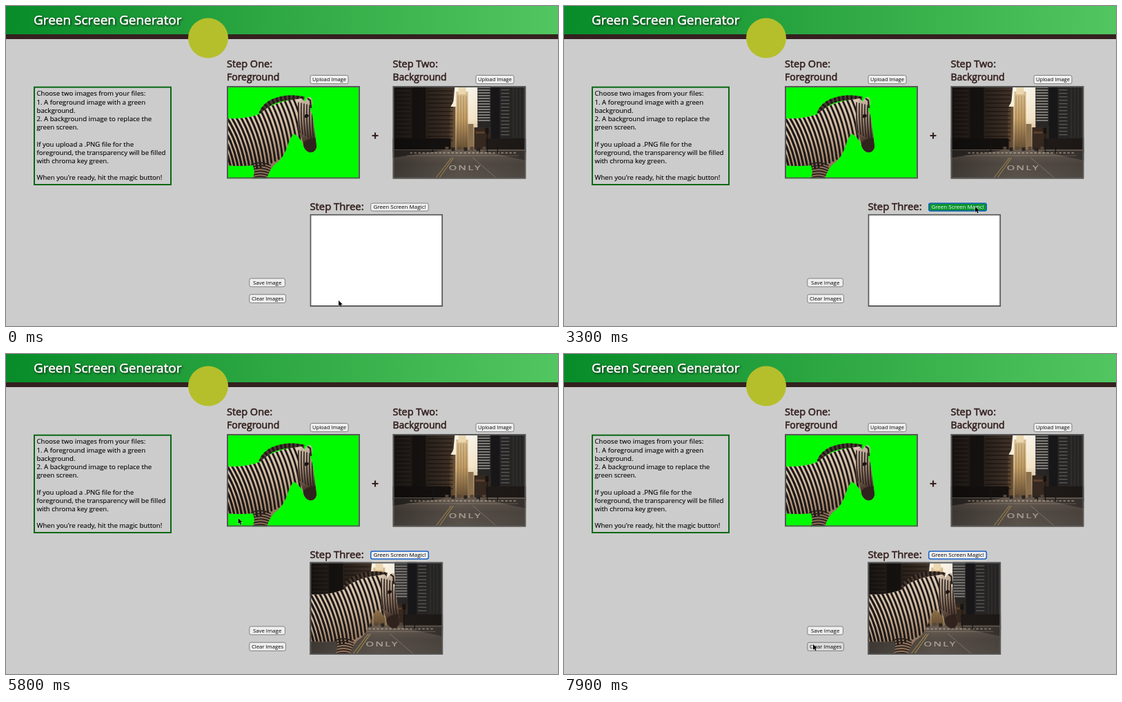
Animation, 800 px wide and 464 px high, one loop 8000 ms. Source, as an HTML page with a canvas:

```html
<!DOCTYPE html>
<html lang="en">
<head>
<meta charset="utf-8">
<title>Green Screen Generator</title>
<style>
  html, body { margin: 0; width: 100%; height: 100%; overflow: hidden; background: #ccc; }
  canvas, svg { position: absolute; left: 0; top: 0; width: 800px; height: 464px; }
  text { font-family: "Open Sans", "Noto Sans", sans-serif; white-space: pre; }
  .title { font-size: 19px; fill: #fff; stroke: #fff; stroke-width: .6px; filter: drop-shadow(1.2px 1.5px 1.5px rgba(0, 0, 0, .8)); }
  .head { fill: #34211f; stroke: #34211f; stroke-width: .6px; }
  .note { font-size: 9.64px; fill: #000; stroke: #000; stroke-width: .12px; }
  .btn rect { fill: #efefef; stroke: #747474; stroke-width: .9px; }
  .btn text { fill: #000; text-anchor: middle; }
  .btn.hover rect { fill: #dcdcdc; }
  .btn.go rect { fill: #0b952f; }
  .btn.go text { fill: #fff; }
  .btn.focus rect { stroke: #1760c4; stroke-width: 1.5px; }
</style>
</head>
<body>
<canvas id="stage" width="800" height="464"></canvas>
<svg id="ui" viewBox="0 0 800 464">
  <text class="title" x="40" y="27">Green Screen Generator</text>
  <g class="head">
    <text x="320" y="89.3" font-size="14.5">Step One:</text>
    <text x="320" y="108" font-size="14">Foreground</text>
    <text x="560.5" y="89.3" font-size="14.5">Step Two:</text>
    <text x="560.5" y="108" font-size="14">Background</text>
    <text x="440.5" y="295.6" font-size="14.8">Step Three:</text>
    <path d="M530.5 188h9M535 183.5v9" style="stroke-width:2.2px"/>
  </g>
  <g id="notes" class="note"></g>
  <g id="buttons"></g>
  <path id="cursor" d="M0 0v8l1.9-1.7 1.4 3.1 1.4-.6-1.4-3h2.6z" fill="#000" stroke="#fff" stroke-width=".7" paint-order="stroke"/>
</svg>
<script>
const LOOP = 8000, STEP = 100, CLICK = 3200, DONE = 3500;
const W = 193, H = 134.5;
const $ = id => document.getElementById(id);
const ctx = $("stage").getContext("2d");

function add(parent, tag, attrs, text) {
  const el = document.createElementNS("http://www.w3.org/2000/svg", tag);
  for (const k in attrs) el.setAttribute(k, attrs[k]);
  if (text) el.textContent = text;
  parent.appendChild(el);
  return el;
}

[
  "Choose two images from your files:",
  "1. A foreground image with a green",
  "background.",
  "2. A background image to replace the",
  "green screen.",
  "",
  "If you upload a .PNG file for the",
  "foreground, the transparency will be filled",
  "with chroma key green.",
  "",
  "When you're ready, hit the magic button!"
].forEach((line, i) => add($("notes"), "text", { x: 44.5, y: 130.4 + 12.2 * i }, line));

function button(label, x, y, w, h, size) {
  const g = add($("buttons"), "g", { class: "btn" });
  add(g, "rect", { x, y, width: w, height: h, rx: 2.4 });
  add(g, "text", { x: x + w / 2, y: y + h / 2 + 2.8, "font-size": size }, label);
  return { g, hit: (px, py) => px > x && px < x + w && py > y && py < y + h };
}
button("Upload Image", 441, 100.5, 55, 12.2, 7.5);
button("Upload Image", 681, 100.5, 55, 12.2, 7.5);
const magic = button("Green Screen Magic!", 528.7, 286, 83.6, 11.2, 8);
button("Save Image", 352.8, 395, 51.6, 12, 7.8);
const clear = button("Clear Images", 352.8, 418.2, 52.6, 12.2, 7.7);

// time, x, y
const route = [
  [0, 482, 427], [200, 488, 422], [900, 650, 310], [1400, 677, 298], [1900, 676, 297],
  [2700, 596, 291], [4400, 596, 291], [4900, 517, 277], [6200, 284, 227],
  [6700, 281, 226], [7500, 355, 411], [7800, 361, 421], [8000, 361, 421]
];
function pointer(t) {
  let i = 1;
  while (route[i][0] < t) i++;
  const [t0, x0, y0] = route[i - 1], [t1, x1, y1] = route[i];
  const u = (t - t0) / (t1 - t0), e = u * u * (3 - 2 * u);
  return [x0 + (x1 - x0) * e, y0 + (y1 - y0) * e];
}

function box(color, x, y, w, h) {
  ctx.fillStyle = color;
  ctx.fillRect(x, y, w, h);
}
function shape(color, d) {
  ctx.fillStyle = color;
  ctx.fill(new Path2D(d));
}
function line(color, width, d) {
  ctx.strokeStyle = color;
  ctx.lineWidth = width;
  ctx.stroke(new Path2D(d));
}
function fade(x0, y0, x1, y1, ...colors) {
  const g = ctx.createLinearGradient(x0, y0, x1, y1);
  colors.forEach((c, i) => g.addColorStop(i / (colors.length - 1), c));
  return g;
}

// Scenes share the panel's own coordinates, border included.
function panel(x, y, ...scenes) {
  ctx.save();
  ctx.translate(x, y);
  ctx.beginPath();
  ctx.rect(0, 0, W, H);
  ctx.clip();
  scenes.forEach(draw => draw());
  ctx.strokeStyle = "#585858";
  ctx.lineWidth = 2;
  ctx.strokeRect(1, 1, W - 2, H - 2);
  ctx.restore();
}

function street() {
  box(fade(0, 0, 0, 95, "#fffaf0", "#fbeccf", "#a98b62"), 0, 0, W, H);
  // far towers
  box(fade(0, 0, 0, 95, "#e0c89c", "#c39e66", "#5d4831"), 92, 8, 17, 88);
  box("#ecd9b2", 95, 2, 11, 10);
  for (let x = 94; x < 109; x += 4) box("rgba(110,80,45,.35)", x, 14, 1.2, 78);
  box(fade(78, 0, 92, 0, "#403225", "#75593a"), 78, 30, 13, 66);
  box("#8f7350", 109, 55, 8, 40);
  // left block
  shape(fade(0, 0, 91, 0, "#1b1715", "#2c231d", "#44352a"), "M0 0H90L88 22 83 32 82 96H0Z");
  box("#181412", 28, 0, 20, 92);
  for (let y = 6; y < 84; y += 6) {
    box("rgba(150,115,85,.14)", 4, y, 22, 1.6);
    box("rgba(15,11,9,.42)", 50, y, 37, 2);
  }
  // right block
  box("#2b2928", 123, 0, 70, 98);
  box("#19191b", 142, 0, 13, 92);
  box("#85837f", 124, 2, 17, 50);
  for (let y = 3; y < 80; y += 4) box("#2c2a28", 123, y, 19, 2);
  for (let y = 5; y < 72; y += 5) box("#666463", 157, y, 12, 1.3);
  for (let x = 174; x < 192; x += 5) box("#383737", x, 0, 1.5, 75);
  box("#382a21", 118, 60, 24, 36);
  box("#5e412d", 120, 66, 14, 3);
  box("#151210", 0, 76, 84, 18);
  box("#211c19", 135, 76, 58, 20);
  // road
  box(fade(0, 90, 0, 135, "#6d6156", "#554d46", "#5a534c"), 0, 92, W, 43);
  shape("#332e2a", "M0 93H76L0 104Z");
  shape("#3f3935", "M193 94H130L193 108Z");
  for (let x = 25; x < 176; x += 6) box("rgba(195,180,160,.6)", x, 96, 3.5, 2);
  line("rgba(190,174,153,.45)", .8, "M20 101H182");
  line("#a58a52", 1.1, "M85 104L62 134M88 104L67 134");
  line("rgba(190,180,165,.5)", .8, "M116 104L151 134");
  // traffic and lamps
  for (let i = 0; i < 7; i++) box(i % 2 ? "#2b2624" : "#59483b", 76 + i * 9, 88 + i % 2, 5, 5);
  line("#191716", 1.3, "M137 60V96M126 91V96M58 78V96M152 88V98");
  box("#171615", 134, 61, 5, 8);
  ctx.save();
  ctx.translate(81, 122);
  ctx.scale(1.8, 1);
  ctx.font = "600 8.5px 'Open Sans', sans-serif";
  ctx.letterSpacing = "1px";
  ctx.fillStyle = "rgba(196,188,174,.75)";
  ctx.fillText("ONLY", 0, 0);
  ctx.restore();
  box(fade(0, 0, W, 0, "rgba(0,0,0,.3)", "rgba(0,0,0,0)", "rgba(0,0,0,.15)"), 0, 0, W, H);
}

function zebra() {
  const body = new Path2D("M0 47C22 48 36 45 49 40C58 30 74 23 96 20L108 18 113 23Q117 14 122 17Q126 24 121 34Q125 43 126 55Q128 70 130 88Q128 98 119 96Q112 93 109 81Q103 72 97 69Q91 76 87 90Q80 108 69 114Q61 123 58 135H37Q42 124 38 115Q18 117 0 115Z");
  const mane = "M50 40Q54 28 68 22Q88 14 112 19";
  line("#4b3a30", 7, mane);
  ctx.setLineDash([3, 3]);
  line("#1f1816", 7, mane);
  ctx.setLineDash([]);
  ctx.save();
  ctx.clip(body);
  box(fade(0, 35, 30, 130, "#e0d0bd", "#cdb69d", "#8f7159"), 0, 0, W, H);
  ctx.lineCap = "round";
  // stripes slant across the neck and bend over the flank
  for (let i = 0; i < 22; i++) {
    const u = i / 21;
    const x = -40 + 134 * u, y = 40 - 26 * u;
    const bx = 2 + 110 * u, by = 126 - 46 * u * u;
    line("#1f1917", 3.3 - .5 * u, `M${x} ${y}Q${x + (bx - x) * .8} ${(y + by) / 2 - 6} ${bx} ${by}`);
  }
  // face and foreleg markings
  shape(fade(105, 20, 125, 75, "#cdbba8", "#a38a75", "#4c382e"), "M108 17L124 15 134 90 112 96Q112 80 105 69Q100 45 108 17Z");
  for (let i = 0; i < 6; i++) {
    line("#2a2220", 1.6, `M${104 + i * 4} ${24 + i}Q${103 + i * 4} ${44 + i * 3} ${106 + i * 4} ${68 + i * 2}`);
    line("#2a211e", 1.9, `M36 ${114 + i * 4}Q49 ${108 + i * 4} 63 ${115 + i * 4}`);
  }
  shape("#30231e", "M111 82Q120 74 132 76V99H112Z");
  shape("#171312", "M113 42Q117 39 119 43Q117 47 113 46Z");
  ctx.restore();
  line("#2f2621", 2.4, "M117 18L121 21 122 32");
}

function page(done) {
  box("#ccc", 0, 0, 800, 464);
  box(fade(0, 0, 800, 0, "#078c29", "#2fa944", "#52c660"), 0, 0, 800, 41);
  box("#34211f", 0, 41, 800, 7);
  ctx.fillStyle = "#b5bf2c";
  ctx.beginPath();
  ctx.arc(293, 46.5, 29, 0, 7);
  ctx.fill();
  ctx.strokeStyle = "#066812";
  ctx.lineWidth = 2;
  ctx.strokeRect(41, 117.7, 198, 141.3);
  panel(320, 116, () => box("#00fb00", 0, 0, W, H), zebra);
  panel(560.5, 116, street);
  if (done) panel(440.3, 301.6, street, zebra);
  else panel(440.3, 301.6, () => box("#fff", 0, 0, W, H));
}

function frame(now) {
  const t = Math.floor(now % LOOP / STEP) * STEP;
  const [x, y] = pointer(t);
  page(t >= DONE);
  magic.g.classList.toggle("go", magic.hit(x, y));
  magic.g.classList.toggle("focus", t >= CLICK);
  clear.g.classList.toggle("hover", clear.hit(x, y));
  $("cursor").setAttribute("transform", `translate(${x} ${y})`);
  requestAnimationFrame(frame);
}
requestAnimationFrame(frame);
</script>
</body>
</html>
```
